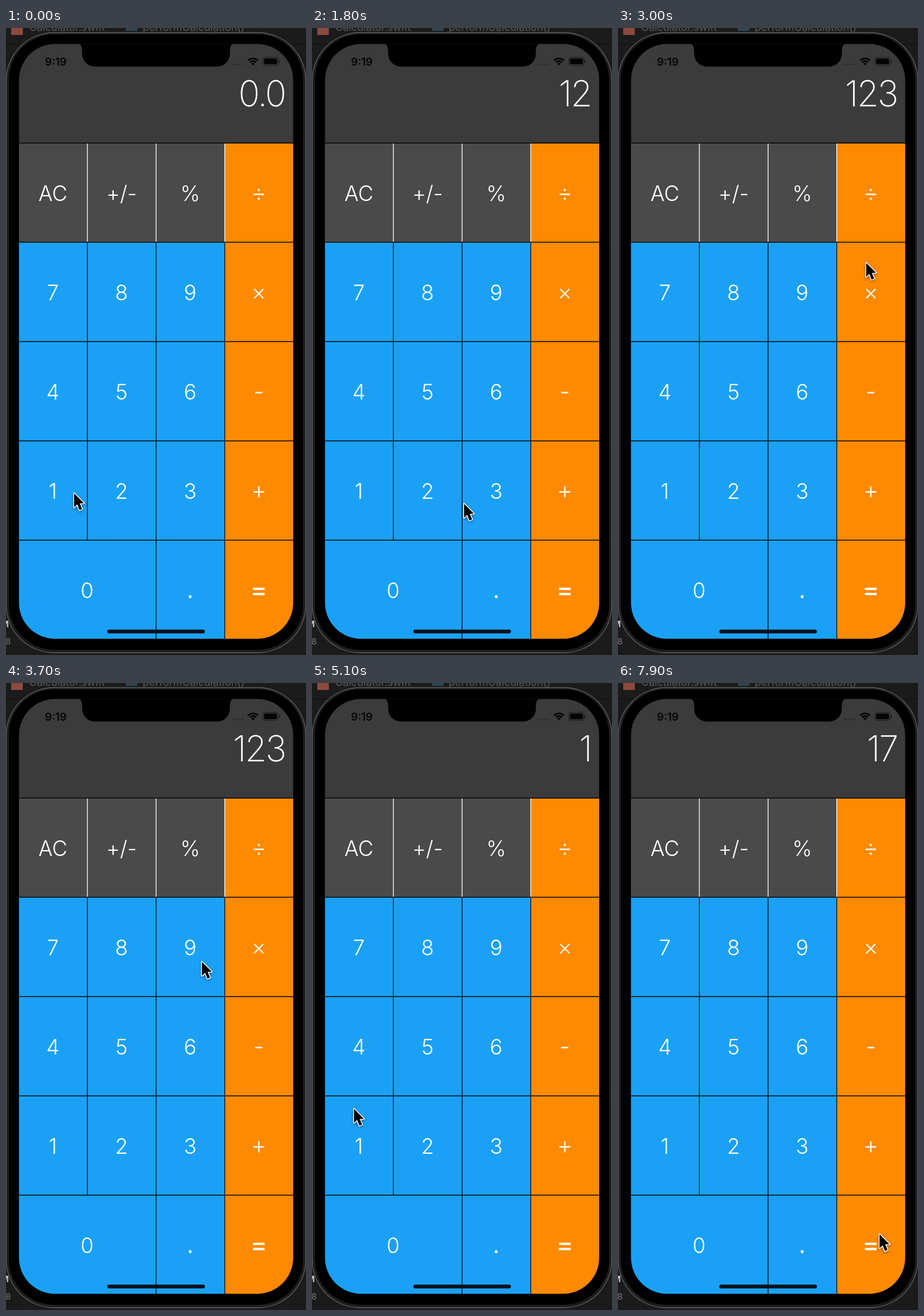
These frames come from a looping animation (518 by 1080 pixels, 8 s). An HTML page with a canvas:

```html
<!DOCTYPE html>
<html lang="en">
<head>
<meta charset="utf-8">
<title>Calculator</title>
<style>
  html, body { margin: 0; width: 100%; height: 100%; overflow: hidden; background: #1b1a1b; }
  canvas { display: block; width: 518px; height: 1080px; }
</style>
</head>
<body>
<canvas id="stage" width="518" height="1080"></canvas>
<script>
const LOOP = 8000, STEP = 100;
const W = 518, H = 1080;
const FONT = 'Inter, "Open Sans", sans-serif';
const BLUE = '#1aa1f6', ORANGE = '#ff8a00', GREY = '#4a4a4a', PANEL = '#3b3b3b';
const COLS = [22, 140.5, 259.2, 377.7, 496];
const ROWS = [198.3, 369, 540.2, 711.2, 882.2, 1052];

const canvas = document.getElementById('stage');
const ctx = canvas.getContext('2d');

// Display value and the time it appears
const readouts = [[0, '0.0'], [600, '1'], [1400, '12'], [2200, '123'], [4600, '1'], [5600, '17']];

// Pointer stops: time, x, y
const stops = [
  [0, 117, 800], [300, 113, 797], [700, 113, 797], [1200, 205, 812], [1500, 212, 814],
  [1800, 262, 818], [2100, 322, 814], [2400, 325, 812], [3000, 428, 403], [3400, 428, 415],
  [4300, 80, 661], [4600, 72, 732], [5100, 72, 732], [5500, 82, 478], [5700, 84, 476],
  [6200, 364, 883], [6600, 441, 944], [7300, 451, 950], [8000, 451, 948]
];

function rect(c, x, y, w, h, color) {
  c.fillStyle = color;
  c.fillRect(x, y, w, h);
}

function round(c, x, y, w, h, r, fill, stroke, width = 1) {
  c.beginPath();
  c.roundRect(x, y, w, h, r);
  if (fill) { c.fillStyle = fill; c.fill(); }
  if (stroke) { c.strokeStyle = stroke; c.lineWidth = width; c.stroke(); }
}

function text(c, str, x, y, size, weight, color = '#fff', align = 'center') {
  c.font = `${weight} ${size}px ${FONT}`;
  c.textAlign = align;
  c.fillStyle = color;
  c.fillText(str, x, y);
}

function line(c, color, width, ...pts) {
  c.strokeStyle = color;
  c.lineWidth = width;
  c.beginPath();
  for (let i = 0; i < pts.length; i += 4) {
    c.moveTo(pts[i], pts[i + 1]);
    c.lineTo(pts[i + 2], pts[i + 3]);
  }
  c.stroke();
}

function drawBackdrop(c) {
  rect(c, 0, 0, W, H, '#1c1b1c');
  rect(c, 0, 27, W, 1, '#101010');
  rect(c, 0, 966, W, 8, '#29282a');
  rect(c, 9, -8, 20, 20, '#8c4a3d');
  text(c, 'Calculator.swift', 40, 5, 18, 400, '#5c5b5c', 'left');
  rect(c, 207, 0, 20, 5, '#2c4552');
  text(c, 'performCalculation()', 236, 5, 18, 400, '#5c5b5c', 'left');
  text(c, 'M', -9, 1032, 15, 600, '#d8d8d8', 'left');
  text(c, '8', -1, 1062, 15, 400, '#777', 'left');
}

function drawBody(c) {
  round(c, 0.5, 8, 517, 1068, 82, '#1d1d1d', '#606060', 1.3);
  round(c, 5, 11, 508, 1060, 78, '#000');
}

function drawKeys(c) {
  rect(c, 22, 27, 474, 1025, PANEL);
  const labels = [['AC', '+/-', '%'], ['7', '8', '9'], ['4', '5', '6'], ['1', '2', '3']];
  rect(c, 22, ROWS[0], 356, 171, GREY);
  rect(c, 22, ROWS[1], 356, 683, BLUE);
  rect(c, COLS[3], ROWS[0], 119, 854, ORANGE);

  for (let r = 0; r < 5; r++) line(c, '#080808', 1.4, 22, ROWS[r], 496, ROWS[r]);
  line(c, '#08121c', 1.4,
    COLS[1], ROWS[1], COLS[1], ROWS[4],
    COLS[2], ROWS[1], COLS[2], 1052,
    COLS[3], ROWS[1], COLS[3], 1052);
  for (let i = 1; i < 4; i++) line(c, '#f4f4f4', 1.4, COLS[i], 199, COLS[i], 368.3);

  labels.forEach((row, r) => row.forEach((label, i) =>
    text(c, label, 81 + i * 118.5, 297.5 + r * 171, 36.5, r ? 300 : 350)));
  text(c, '0', 140, 981.5, 36.5, 300);
  round(c, 315.5, 977, 5, 5, 2, '#fff');

  const x = 436.5;
  line(c, '#fff', 2.4, x - 9, 286.5, x + 9, 286.5);
  for (const y of [279, 294]) {
    c.fillStyle = '#fff';
    c.beginPath();
    c.arc(x, y, 2, 0, 7);
    c.fill();
  }
  line(c, '#fff', 2.4, x - 8, 449.5, x + 8, 465.5, x + 8, 449.5, x - 8, 465.5);
  line(c, '#fff', 2.6, x - 6, 628, x + 6, 628);
  line(c, '#fff', 2.4, x - 9.5, 799, x + 9.5, 799, x, 789.5, x, 808.5);
  line(c, '#fff', 4.2, x - 10, 966, x + 10, 966, x - 10, 975, x + 10, 975);
}

function drawStatus(c) {
  c.fillStyle = '#000';
  c.beginPath();
  c.moveTo(122, 26);
  c.quadraticCurveTo(131.5, 28, 131.5, 38);
  c.lineTo(131.5, 44);
  c.arcTo(131.5, 66.5, 154, 66.5, 22);
  c.lineTo(364, 66.5);
  c.arcTo(386.5, 66.5, 386.5, 44, 22);
  c.lineTo(386.5, 38);
  c.quadraticCurveTo(386.5, 28, 396, 26);
  c.fill();

  text(c, '9:19', 86, 64.5, 18.5, 600, '#050505');
  for (let i = 0; i < 4; i++) round(c, 390 + i * 5.6, 61, 3.4, 3.4, 1.7, '#2c2c2c');

  // Wi-Fi
  c.save();
  c.beginPath();
  c.moveTo(426.5, 64.5);
  c.lineTo(412.5, 50.5);
  c.lineTo(440.5, 50.5);
  c.clip();
  c.strokeStyle = c.fillStyle = '#050505';
  c.lineWidth = 2.8;
  for (const r of [7.5, 12]) {
    c.beginPath();
    c.arc(426.5, 64.5, r, Math.PI, 0);
    c.stroke();
  }
  c.beginPath();
  c.arc(426.5, 64.5, 4.4, Math.PI, 0);
  c.fill();
  c.restore();

  // Battery
  round(c, 443.5, 50.5, 26.5, 14, 4, null, '#1c1c1c', 1.2);
  round(c, 445.5, 52.5, 22.5, 10, 2.2, '#050505');
  round(c, 471.3, 55.5, 1.7, 4.5, 1, '#1c1c1c');
}

function makeScene() {
  const layer = document.createElement('canvas');
  layer.width = W;
  layer.height = H;
  const c = layer.getContext('2d');
  drawBackdrop(c);
  drawBody(c);
  c.save();
  c.beginPath();
  c.roundRect(22.5, 27.5, 473.3, 1024.5, 62);
  c.clip();
  drawKeys(c);
  drawStatus(c);
  c.restore();
  round(c, 175, 1036.3, 168.5, 6.4, 3.2, '#08101a');
  return layer;
}

function drawReadout(t) {
  const value = readouts.filter(r => r[0] <= t).pop()[1];
  ctx.letterSpacing = '-2.5px';
  text(ctx, value, 482, 134.5, 61.5, 200, '#fff', 'right');
  ctx.letterSpacing = '0px';
}

function pointerAt(t) {
  const i = stops.findIndex(s => s[0] > t);
  const [t0, x0, y0] = stops[i - 1], [t1, x1, y1] = stops[i];
  const p = (t - t0) / (t1 - t0);
  const k = p * p * (3 - 2 * p);
  return [x0 + (x1 - x0) * k, y0 + (y1 - y0) * k];
}

function drawPointer(x, y) {
  ctx.save();
  ctx.translate(x, y);
  ctx.beginPath();
  ctx.moveTo(0.5, 1.5);
  for (const [px, py] of [[0.5, 25.5], [6, 20.5], [10, 30.5], [14.5, 28.5], [10.3, 19], [17.5, 18.5]])
    ctx.lineTo(px, py);
  ctx.closePath();
  ctx.lineJoin = 'round';
  ctx.shadowColor = 'rgba(0,0,0,.4)';
  ctx.shadowBlur = 4;
  ctx.shadowOffsetY = 2;
  ctx.strokeStyle = '#fff';
  ctx.lineWidth = 3;
  ctx.stroke();
  ctx.shadowColor = 'transparent';
  ctx.fillStyle = '#000';
  ctx.fill();
  ctx.restore();
}

const scene = makeScene();
const start = performance.now();

function frame() {
  const now = Math.max(0, performance.now() - start) % LOOP;
  const t = Math.floor(now / STEP) * STEP;
  ctx.drawImage(scene, 0, 0);
  drawReadout(t);
  drawPointer(...pointerAt(t));
  requestAnimationFrame(frame);
}
frame();
</script>
</body>
</html>
```
